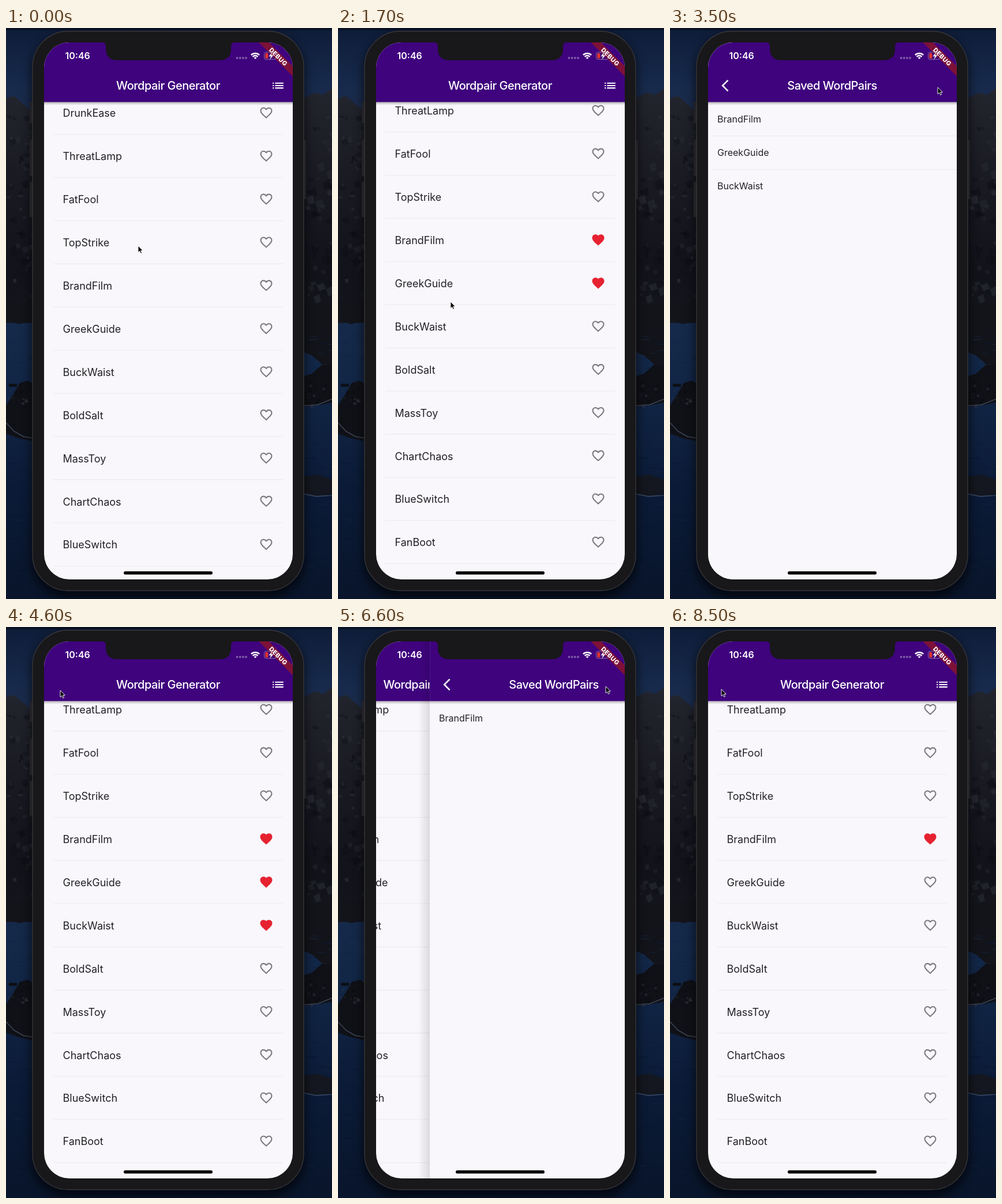
Write an HTML page that moves like this. It is 565 px wide and 991 px high and loops after 8700 ms.

```html
<!DOCTYPE html>
<html lang="en">
<head>
<meta charset="utf-8">
<title>Wordpair Generator</title>
<style>
  html, body { margin: 0; width: 100%; height: 100%; overflow: hidden; background: #0b1830; }
  svg { display: block; width: 100%; height: 100%; }
  text { font-family: Inter, "Open Sans", sans-serif; }
  .title { font-size: 20px; font-weight: 500; letter-spacing: -.5px; fill: #fff; text-anchor: middle; }
  .row { font-size: 18px; fill: #222125; }
  .saved { font-size: 16px; fill: #222125; }
</style>
</head>
<body>
<svg id="stage" viewBox="0 0 565 991" preserveAspectRatio="none">
  <defs>
    <linearGradient id="sky" x2="0" y2="1">
      <stop offset="0" stop-color="#0e1c38"/><stop offset=".1" stop-color="#172a4c"/><stop offset=".16" stop-color="#1c2b48"/>
    </linearGradient>
    <linearGradient id="rock" x2="0" y2="1">
      <stop offset="0" stop-color="#23252e"/><stop offset=".35" stop-color="#191a22"/>
      <stop offset=".7" stop-color="#12131a"/><stop offset="1" stop-color="#17191f"/>
    </linearGradient>
    <linearGradient id="sea" x2="0" y2="1">
      <stop offset="0" stop-color="#15294a"/><stop offset=".25" stop-color="#112545"/>
      <stop offset=".6" stop-color="#0b1b37"/><stop offset="1" stop-color="#09152b"/>
    </linearGradient>
    <linearGradient id="barShade" x2="0" y2="1">
      <stop offset="0" stop-color="#000" stop-opacity=".3"/><stop offset="1" stop-color="#000" stop-opacity="0"/>
    </linearGradient>
    <linearGradient id="edgeShade">
      <stop offset="0" stop-color="#000" stop-opacity="0"/><stop offset="1" stop-color="#000" stop-opacity=".12"/>
    </linearGradient>
    <filter id="blur" x="-20%" y="-20%" width="140%" height="140%"><feGaussianBlur stdDeviation="9"/></filter>
    <clipPath id="screen"><rect x="66" y="25" width="431" height="932" rx="44"/></clipPath>
  </defs>

  <rect width="565" height="991" fill="url(#sky)"/>
  <path d="M0 122L14 118 30 132 50 150V540H0ZM565 105L550 116 535 112 510 125V560H565Z" fill="url(#rock)"/>
  <rect y="512" width="565" height="479" fill="url(#sea)"/>
  <path d="M0 470L20 476 50 474V508L22 514 0 505ZM510 480H565V596L548 584 530 568 510 560Z" fill="#13141a"/>
  <path d="M0 655L10 640 24 616 38 612 50 620V718L22 712 0 704ZM510 606L530 600 548 584 565 588V650L540 655 510 658Z" fill="#101117"/>
  <path d="M510 780L540 775 565 784V810L535 812 510 806Z" fill="#14171f"/>
  <path d="M5 620h14" stroke="#0c0e14" stroke-width="5"/>
  <path d="M0 685L14 700 30 709 48 712M512 656L540 654 565 644M512 808L538 813 565 811" fill="none" stroke="#6c7c93" stroke-opacity=".5" stroke-width="1.5"/>
  <g id="texture"></g>
  <rect width="565" height="4" fill="#060c1a" opacity=".6"/>

  <rect x="44" y="12" width="474" height="976" rx="64" fill="#000" opacity=".65" filter="url(#blur)"/>
  <path d="M43.5 129V165M43.5 194V257M43.5 267V328M517.5 195V297" stroke="#222126" stroke-width="5"/>
  <rect x="46" y="5.5" width="470" height="971" rx="62" fill="#18171a" stroke="#39383b" stroke-width="1.3"/>

  <g clip-path="url(#screen)">
    <g id="home">
      <rect x="66" y="25" width="431" height="932" fill="#f9f7fb"/>
      <g id="list"></g>
      <rect x="66" y="128" width="431" height="6" fill="url(#barShade)"/>
      <rect x="66" y="25" width="431" height="103.5" fill="#3f037e"/>
      <text class="title" x="281" y="107">Wordpair Generator</text>
      <path transform="translate(459 87.5) scale(1.04)" fill="#fff" d="M3 7h2v2H3zM7 7h14v2H7zM3 11h2v2H3zM7 11h14v2H7zM3 15h2v2H3zM7 15h14v2H7z"/>
    </g>
    <g id="savedPage">
      <rect x="46" y="25" width="20" height="932" fill="url(#edgeShade)"/>
      <rect x="66" y="25" width="431" height="932" fill="#f9f7fb"/>
      <g id="savedList"></g>
      <rect x="66" y="128" width="431" height="6" fill="url(#barShade)"/>
      <rect x="66" y="25" width="431" height="103.5" fill="#3f037e"/>
      <text class="title" x="281" y="107">Saved WordPairs</text>
      <path transform="translate(89.3 87.5) scale(1.04)" fill="#fff" d="M11.67 3.87L9.9 2.1 0 12l9.9 9.9 1.77-1.77L3.54 12z"/>
    </g>
    <path d="M438.2 25H455.8L497 66.2V83.8Z" fill="#7d1138"/>
    <g fill="#7d5aa6">
      <circle cx="400.5" cy="52" r="2"/><circle cx="405.7" cy="52" r="2"/><circle cx="410.9" cy="52" r="2"/><circle cx="416" cy="52" r="2"/>
    </g>
    <g fill="none" stroke="#fff" stroke-width="2.4">
      <path d="M424.9 46.9A10 10 0 0 1 439.1 46.9M427.6 49.8A6.2 6.2 0 0 1 436.4 49.8"/>
      <path d="M432 54L429.6 51.7A3.4 3.4 0 0 1 434.4 51.7Z" fill="#fff" stroke="none"/>
    </g>
    <rect x="447.5" y="42" width="21" height="12.5" rx="3.5" fill="none" stroke="#8d6d9f" stroke-width="1"/>
    <rect x="449.3" y="43.8" width="5" height="9" rx="1.5" fill="#e2352c"/>
    <path d="M461.5 41.5L455.5 49.2H459.2L457.2 55 463.4 47.2H459.6Z" fill="#fff"/>
    <text transform="translate(472 50) rotate(45)" y="3.9" text-anchor="middle" fill="#fff" font-size="10.7" font-weight="800" letter-spacing=".5">DEBUG</text>
  </g>
  <path d="M166 24V25Q173 25 173 32V36Q173 56 193 56H370Q390 56 390 36V32Q390 25 397 25V24Z" fill="#18171a"/>
  <text x="102.5" y="54" fill="#fff" font-size="16" font-weight="600">10:46</text>
  <rect x="204" y="943" width="154" height="5.6" rx="2.8" fill="#000"/>
  <path id="cursor" d="M0 0V11.6L2.7 9.2 4.5 13.3 6.5 12.4 4.7 8.4H8.2Z" fill="#000" stroke="#fff" stroke-width=".9"/>
</svg>
<script>
const LOOP = 8700, STEP = 100, WIDTH = 431, PITCH = 74.9;
const WORDS = ["DrunkEase", "ThreatLamp", "FatFool", "TopStrike", "BrandFilm", "GreekGuide",
  "BuckWaist", "BoldSalt", "MassToy", "ChartChaos", "BlueSwitch", "FanBoot"];
// When each word is a favourite: [from, until]
const LIKED = { BrandFilm: [1200, LOOP], GreekGuide: [1600, 5800], BuckWaist: [2000, 5400] };
// When the saved page slides in and out: [start, end]
const VISITS = [[[2800, 3300], [4100, 4500]], [[6400, 6900], [7950, 8450]]];
const CURSOR = [
  [0, 229, 378], [700, 226, 376], [1100, 200, 374], [1300, 200, 374], [1500, 196, 450], [1700, 195, 475],
  [1900, 194, 516], [2100, 194, 516], [2700, 464, 103], [3600, 464, 103], [4100, 94, 110], [4700, 94, 110],
  [5200, 449, 514], [5400, 449, 514], [5700, 448, 440], [5900, 448, 440], [6300, 464, 103],
  [7100, 464, 103], [7700, 89, 108], [LOOP, 89, 108]
];
const FULL = "M12 21.35l-1.45-1.32C5.4 15.36 2 12.28 2 8.5 2 5.42 4.42 3 7.5 3c1.74 0 3.41.81 4.5 2.09C13.09 3.81 14.76 3 16.5 3 19.58 3 22 5.42 22 8.5c0 3.78-3.4 6.86-8.55 11.54z";
const HOLLOW = FULL + "M12.1 18.55l-.1.1-.1-.1C7.14 14.24 4 11.39 4 8.5 4 6.5 5.5 5 7.5 5c1.54 0 3.04.99 3.57 2.36h1.87C13.46 5.99 14.96 5 16.5 5c2 0 3.5 1.5 3.5 3.5 0 2.89-3.14 5.74-7.9 10.05z";

const $ = id => document.getElementById(id);

function add(parent, tag, attrs, text) {
  const el = document.createElementNS("http://www.w3.org/2000/svg", tag);
  for (const name in attrs) el.setAttribute(name, attrs[name]);
  if (text) el.textContent = text;
  parent.appendChild(el);
  return el;
}

const divider = (parent, x1, x2, y) =>
  add(parent, "path", { d: `M${x1} ${y}H${x2}`, stroke: "#ebeaee", "stroke-width": 1.1 });

const move = (el, x, y) => el.setAttribute("transform", `translate(${x} ${y})`);
const clamp = v => Math.min(1, Math.max(0, v));
const progress = (t, [a, b]) => clamp((t - a) / (b - a));
const easeOut = p => 1 - (1 - p) ** 3;
const smooth = p => p * p * (3 - 2 * p);
const isLiked = (word, t) => {
  const span = LIKED[word];
  return !!span && t >= span[0] && t < span[1];
};

function buildTexture() {
  let seed = 11;
  const rnd = () => (seed = seed * 16807 % 2147483647) / 2147483647;
  const shards = (n, top, bottom, colors, size, flat) => {
    for (let i = 0; i < n; i++) {
      const x = (i % 2 ? 518 : 0) + rnd() * 46, y = top + rnd() * (bottom - top);
      const w = (.4 + rnd()) * size, h = w * flat * (.5 + rnd());
      add($("texture"), "path", {
        d: `M${x} ${y}l${w} ${-h * .4} ${w * .3} ${h} ${-w * .9} ${h * .3}z`,
        fill: colors[i % 4 >> 1], opacity: .15 + rnd() * .35
      });
    }
  };
  shards(110, 150, 470, ["#34363f", "#0b0c12"], 9, .9);
  shards(36, 610, 655, ["#3a3d45", "#08090d"], 5, .8);
  shards(50, 530, 590, ["#1d3355", "#0c1c38"], 12, .1);
  shards(70, 720, 960, ["#152846", "#081227"], 14, .1);
}

const rows = WORDS.map((word, i) => {
  const y = 148 + i * PITCH, list = $("list");
  add(list, "text", { class: "row", x: 98.5, y: y + 6.4 }, word);
  divider(list, 82, 480, y + 36.7);
  const heart = add(list, "path", {
    transform: `translate(${451 - 12.6} ${y - 13.4}) scale(1.05)`, "fill-rule": "evenodd"
  });
  return { word, heart };
});

const savedRows = Object.keys(LIKED).map((word, i) => {
  const g = add($("savedList"), "g", {}), y = 158.2 + i * 58.2;
  if (i) divider(g, 74, 497, y - 29);
  add(g, "text", { class: "saved", x: 82, y: y + 5.8 }, word);
  return { word, g };
});

function cursorAt(t) {
  const i = CURSOR.findIndex(k => k[0] > t);
  const [t0, x0, y0] = CURSOR[i - 1], [t1, x1, y1] = CURSOR[i];
  const p = smooth((t - t0) / (t1 - t0));
  return [x0 + (x1 - x0) * p, y0 + (y1 - y0) * p];
}

function draw(t) {
  move($("list"), 0, -79 * easeOut(progress(t, [0, 900])));
  for (const { word, heart } of rows) {
    const on = isLiked(word, t);
    heart.setAttribute("d", on ? FULL : HOLLOW);
    heart.setAttribute("fill", on ? "#e62231" : "#7c7a7f");
  }
  for (const { word, g } of savedRows) g.style.display = isLiked(word, t) ? "" : "none";

  const open = VISITS.reduce((sum, [enter, leave]) =>
    sum + easeOut(progress(t, enter)) - easeOut(progress(t, leave)), 0);
  move($("home"), -WIDTH / 3 * open, 0);
  move($("savedPage"), WIDTH * (1 - open), 0);
  $("savedPage").style.display = open > .001 ? "" : "none";
  move($("cursor"), ...cursorAt(t));
}

function tick() {
  const t = performance.now() % LOOP;
  draw(Math.min(Math.floor(t / STEP) * STEP, LOOP - 2 * STEP));
  requestAnimationFrame(tick);
}

buildTexture();
tick();
</script>
</body>
</html>
```
